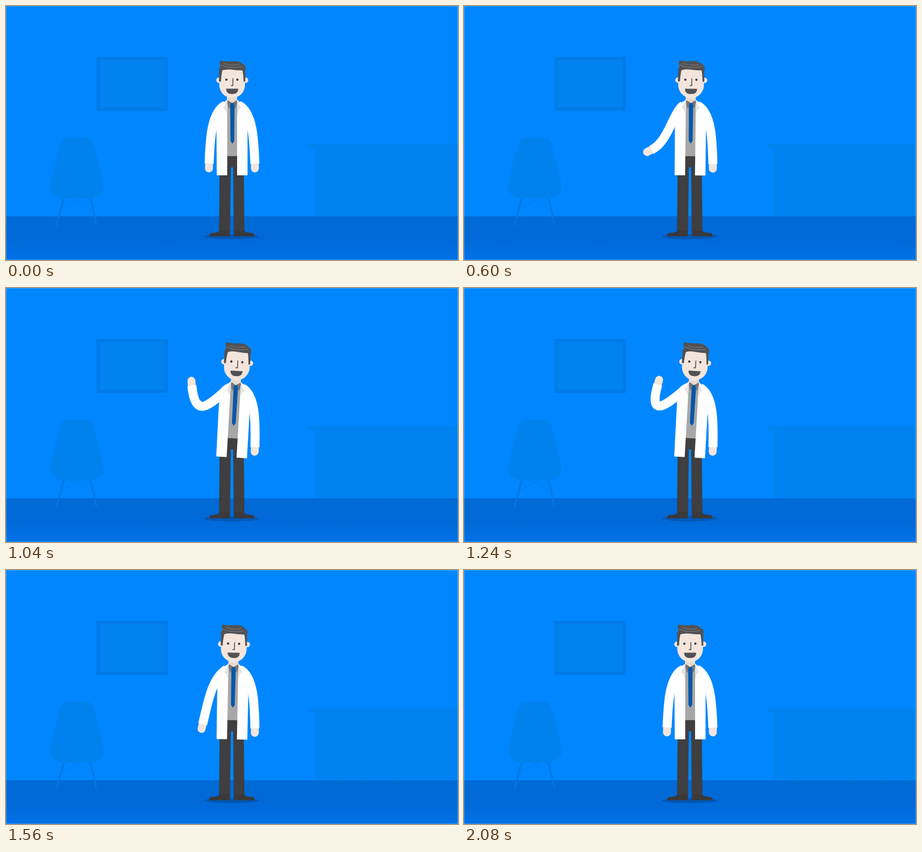
An HTML page that plays this animation: 800 by 450 pixels, repeating every 2.32 s.

```html
<!DOCTYPE html>
<html lang="en">
<head>
<meta charset="utf-8">
<title>Waving doctor</title>
<style>
  html, body { margin: 0; height: 100%; overflow: hidden; background: #0087ff; }
  svg { display: block; width: 100vw; height: 100vh; }
  .line { fill: none; }
  .skin { fill: #f3e5dc; }
  .hair { fill: #525153; }
  .hand { fill: none; stroke: #f3e5dc; stroke-width: 14; stroke-linecap: round; }
  .sleeve { fill: none; stroke: #fff; stroke-width: 16; }
</style>
</head>
<body>
<svg viewBox="0 0 800 450">
  <defs>
    <linearGradient id="floor" x2="0" y2="1">
      <stop offset="0" stop-color="#006ad5"/>
      <stop offset=".55" stop-color="#0069d8"/>
      <stop offset="1" stop-color="#0073e8"/>
    </linearGradient>
  </defs>

  <!-- room -->
  <rect width="800" height="450" fill="#0087ff"/>
  <rect y="372.5" width="800" height="78" fill="url(#floor)"/>
  <rect x="163" y="93" width="121" height="90" fill="#0083f0" stroke="#007be8" stroke-width="6"/>
  <path d="M536 244H800V372H547V252H536Z" fill="#0083f0"/>
  <g class="line" stroke="#0078e2">
    <path d="M103 338L89 389M149 338L160 388" stroke-width="4" stroke-opacity=".75"/>
    <path d="M118 341L147 357M134 341L100 357" stroke-width="2" stroke-opacity=".3"/>
  </g>
  <path d="M111 233H141Q151 233 154 242Q166 280 173 320Q174 328 168 333Q160 341 148 341H104Q91 341 83 333Q77 328 78 320Q85 280 97 242Q100 233 111 233Z" fill="#0082ee"/>
  <rect x=".5" y=".5" width="799" height="449" fill="none" stroke="#fff" stroke-opacity=".22"/>

  <!-- legs -->
  <ellipse cx="399.5" cy="408.5" rx="49" ry="4.800" fill="#0058b4"/>
  <path d="M378 262H421V300L422 402H403L402 286H398L396.500 402H377L378 300Z" fill="#3f3e40"/>
  <path id="shoe" d="M378 398H396V408H360Q358 403 365 402Q374 402 378 398Z" fill="#3b393b"/>
  <use href="#shoe" transform="matrix(-1 0 0 1 799.5 0)"/>

  <path id="hand" class="hand"/>
  <path id="sleeve" class="sleeve"/>

  <g id="body">
    <g transform="matrix(-1 0 0 1 800 0)">
      <path class="hand" d="M359.500 279L359.500 287.700"/>
      <path class="sleeve" d="M388 176C363 188 361 238 359.500 279.500"/>
    </g>
    <path d="M391 150H409V168L400 174L391 168Z" fill="#eadbd1"/>
    <path d="M391 167L400 172L409.500 167V266H391Z" fill="#a8a7a7"/>
    <path d="M391.500 166Q388 169 382 172Q374 177 372.500 186V222L373 300H391.500Z
             M409 166Q412 169 418 172Q426 177 427.500 186V300H409Z" fill="#fff"/>
    <path d="M391.500 168L384 181L388 184L391.500 194ZM409 168L416 181L412 184L409 194Z" fill="#e5e4e5"/>
    <path d="M393 167L400.500 172L394.500 182L391.500 170ZM408 167L400.500 172L406.500 182L409.500 170Z" fill="#777678"/>
    <path d="M398 172H403L404.500 177L404 239L400.700 244L397.300 239L396.800 177Z" fill="#0857a8"/>

    <!-- head -->
    <g class="skin">
      <circle cx="377" cy="131.500" r="4.800"/>
      <circle cx="424" cy="131.500" r="4.800"/>
      <path d="M377.500 108H423V140A22.750 23 0 0 1 377.500 140Z"/>
    </g>
    <path class="hair" d="M379 96.500Q389 99 402 97.500Q414 97 419 103Q426 106 423.500 113V134H420.500Q420 121 418.500 114Q408 114 397 112.500Q388 112 383 114Q381 122 380.500 134H377V113Q376 109 380 107Q377 103 379 96.500Z"/>
    <path class="line" stroke="#7f7e81" d="M380 104.500Q396 112 418 107M386 102Q400 107 413 103"/>
    <ellipse class="eye" cx="390" cy="130.500" rx="2" ry="2" fill="#363438"/>
    <ellipse class="eye" cx="409.500" cy="130.500" rx="2" ry="2" fill="#363438"/>
    <path class="line" stroke="#444345" stroke-width="1.400" d="M401.500 128V141H398"/>
    <path class="hair" d="M389.500 146.500H411Q411 156 400.300 156Q389.500 156 389.500 146.500Z"/>
  </g>
</svg>
<script>
const LOOP = 2320;
const $ = s => document.querySelector(s);
const body = $('#body'), hand = $('#hand'), sleeve = $('#sleeve');
const eyes = document.querySelectorAll('.eye');

// pose: lean, then shoulder, two bend points and wrist as x, y pairs
const rest = [0, 388,176, 363,188, 361,238, 359.5,279];
const low  = [.2, 388,176, 369,190, 362,240, 332,255];
const out  = [.58, 391,177, 367,206, 346,233, 320,214];
const up   = [1, 394,177, 366,200, 328,240, 336,171];
const inn  = [1, 394,177, 366,201, 324,238, 343,171];
const away = [1, 394,177, 366,200, 335,239, 329,173];
const drop = [.35, 390,176, 364,192, 357,236, 348,273];
const keys = [
  [0, rest], [420, rest], [600, low], [720, out], [840, up],
  [920, inn], [1040, away], [1160, inn], [1240, inn],
  [1320, away], [1400, out], [1480, low], [1560, drop], [1720, rest], [LOOP, rest]
];
const leans = [[1480, .5]];

// slope through key i, flat at turning points
function slope(i, n) {
  const a = keys[i - 1], b = keys[i], c = keys[i + 1];
  if (!a || !c || (b[1][n] - a[1][n]) * (c[1][n] - b[1][n]) <= 0) return 0;
  return (c[1][n] - a[1][n]) / (c[0] - a[0]);
}

function poseAt(t) {
  const i = keys.findIndex(k => k[0] > t) - 1;
  const [t0, a] = keys[i], [t1, b] = keys[i + 1];
  const d = t1 - t0, u = (t - t0) / d, v = 1 - u;
  return a.map((p, n) =>
    p * v * v * (1 + 2 * u) + b[n] * u * u * (3 - 2 * u) +
    d * u * v * (v * slope(i, n) - u * slope(i + 1, n)));
}

for (const [time, lean] of leans) {
  const key = keys.find(k => k[0] === time);
  key[1] = [lean, ...key[1].slice(1)];
}

function draw() {
  const t = performance.now() % LOOP;
  const [lean, sx, sy, ax, ay, bx, by, wx, wy] = poseAt(t);
  const len = Math.hypot(wx - bx, wy - by);
  const hx = wx + (wx - bx) / len * 8.7, hy = wy + (wy - by) / len * 8.7;
  body.setAttribute('transform', `rotate(${3.3 * lean} 398 283)`);
  sleeve.setAttribute('d', `M${sx} ${sy}C${ax} ${ay} ${bx} ${by} ${wx} ${wy}`);
  hand.setAttribute('d', `M${wx} ${wy}L${hx} ${hy}`);
  const open = Math.min(1, Math.max(.35, Math.abs(t - 850) / 70));
  eyes.forEach(e => e.setAttribute('ry', 2 * open));
  requestAnimationFrame(draw);
}
draw();
</script>
</body>
</html>
```
